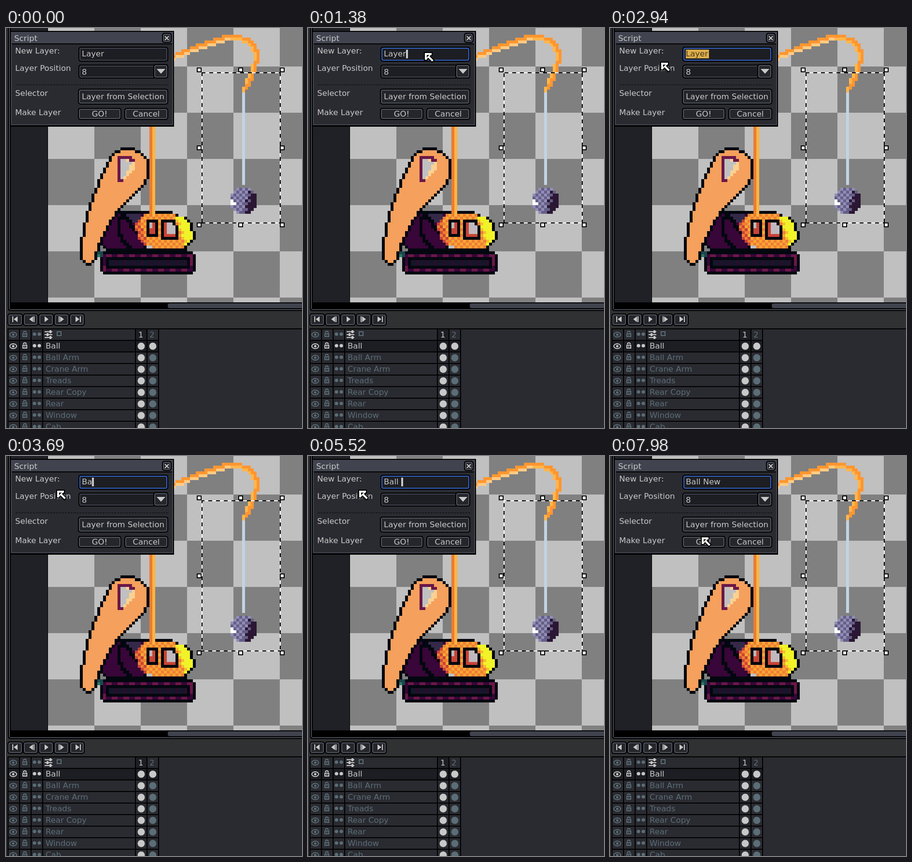
Animation of 613 by 831 pixels, one loop 8 s. Source, as an HTML page with a canvas:

```html
<!DOCTYPE html>
<html lang="en">
<head>
<meta charset="utf-8">
<title>Layer script dialog</title>
<style>
  html, body { margin: 0; width: 613px; height: 831px; overflow: hidden; background: #303132; }
  canvas { display: block; }
</style>
</head>
<body>
<canvas id="stage" width="613" height="831"></canvas>
<script>
const LOOP = 8000, CELL = 6, LEFT = 87, TOP = 2;
const INK = '#02070f', PANEL = '#2a2b31', DARK = '#1d1e23', LIGHT = '#c8c8c8', DIM = '#5b6d76';
const PLUM = '#380638', MAROON = '#6b1748', RED = '#c74435', RUST = '#ef7d35', AMBER = '#f8a634';
const stage = document.getElementById('stage').getContext('2d');
const back = document.createElement('canvas');
back.width = 613;
back.height = 831;
let g = back.getContext('2d');

// ---- drawing helpers ----
function rect(color, x, y, w, h) {
  g.fillStyle = color;
  g.fillRect(x, y, w, h);
}
function round(color, x, y, w, h, r = 4) {
  g.fillStyle = color;
  g.beginPath();
  g.roundRect(x, y, w, h, r);
  g.fill();
}
function box(x, y, w, h, line = '#50535f', fill = '#25262b') {
  round('#000', x, y, w, h, 5);
  round(line, x + 2, y + 2, w - 4, h - 4);
  round(fill, x + 4, y + 4, w - 8, h - 8, 2);
}
function useFont() {
  g.font = '16.5px "DejaVu Sans", sans-serif';
}
function text(str, x, y, color = LIGHT) {
  useFont();
  g.fillStyle = color;
  g.fillText(str, x, y);
}
function textWidth(str) {
  useFont();
  return g.measureText(str).width;
}
function polygon(color, ...points) {
  g.fillStyle = color;
  g.beginPath();
  points.forEach(p => g.lineTo(...p));
  g.closePath();
  g.fill();
}
function disc(color, x, y, r) {
  g.fillStyle = color;
  g.beginPath();
  g.arc(x, y, r, 0, 7);
  g.fill();
}

// ---- pixel art on the six-pixel sprite grid ----
const snap = (v, origin) => origin + Math.floor((v - origin) / CELL) * CELL;

function cells(color, inside) {
  for (let x = LEFT; x < 613; x += CELL)
    for (let y = TOP; y < 560; y += CELL)
      if (inside(x + 3, y + 3)) {
        const odd = ((x - LEFT + y - TOP) / CELL) & 1;
        rect(typeof color === 'function' ? color(x, y, odd) : color, x, y, CELL, CELL);
      }
}
function outlined(fill, inside) {
  cells(fill, inside);
  cells(INK, (x, y) => inside(x, y) &&
    !(inside(x - 6, y) && inside(x + 6, y) && inside(x, y - 6) && inside(x, y + 6)));
}
// Superellipse test; the lean shifts it sideways with height.
function oval(cx, cy, rx, ry, power = 2, lean = 0) {
  return (x, y) => Math.abs((x - cx - lean * (y - cy)) / rx) ** power + Math.abs((y - cy) / ry) ** power < 1;
}
function shape(...points) {
  const path = new Path2D();
  points.forEach(p => path.lineTo(...p));
  return (x, y) => g.isPointInPath(path, x, y);
}
function curve(color, [a, b, c, d], dx = 0, dy = 0) {
  for (let t = 0; t <= 1; t += 0.01) {
    const u = 1 - t;
    const at = i => u ** 3 * a[i] + 3 * u * u * t * b[i] + 3 * u * t * t * c[i] + t ** 3 * d[i];
    rect(color, snap(at(0) + dx, LEFT), snap(at(1) + dy, TOP), CELL, CELL);
  }
}

function drawTreads() {
  rect(INK, 225, 458, 150, 12);
  cells(INK, oval(294, 488, 101, 25, 6));
  cells((x, y) => (x - LEFT + (y > 488 ? 12 : 0)) % 24 < 12 ? MAROON : PLUM, oval(294, 488, 95, 19, 6));
  rect(INK, 207, 476, 174, 24);
  for (let x = 213; x < 375; x += 18) {
    rect('#151629', x, 482, 12, 12);
    rect('#290d2b', x + 12, 482, 6, 12);
  }
  rect('#1d474d', 189, 464, 12, 12);
  rect('#2c7760', 189, 470, 6, 6);
}

// A swept circle that shrinks and bends toward the tip.
function inArm(x, y) {
  for (let t = 0; t <= 1; t += 0.04) {
    const u = 1 - t;
    if (Math.hypot(x - 171 - 82 * u ** 1.7, y - 294 - 186 * t) < 19 + 27 * u ** 1.5) return true;
  }
  return false;
}

function drawArm() {
  outlined('#f5a05c', inArm);
  cells(MAROON, shape([231, 266], [256, 266], [267, 278], [243, 320], [231, 320]));
  cells('#fbd192', shape([243, 272], [268, 278], [264, 298], [243, 320]));
  cells('#c0c0c0', shape([237, 272], [262, 278], [243, 314], [237, 314]));
}

function drawCab() {
  const cab = oval(327, 422, 57, 37, 2.5, 0.2);
  cells(INK, (x, y) => x > 340 && cab(x - 6, y));
  cells((x, y, odd) => {
    const tone = x - 0.35 * (y - 386);
    if (tone < 270) return odd ? RED : RUST;
    if (tone > 346) return odd || tone > 352 ? '#f1f329' : '#f6bd2e';
    return odd ? RUST : AMBER;
  }, cab);
  rect(INK, 291, 398, 24, 36);
  rect(RED, 297, 404, 12, 24);
  rect('#c0b4b6', 297, 404, 6, 12);
  cells(INK, shape([321, 398], [345, 398], [357, 416], [357, 440], [321, 440]));
  rect(RED, 327, 404, 24, 30);
  cells(INK, shape([339, 398], [351, 398], [351, 416]));
  cells('#c0b9bd', shape([333, 404], [339, 404], [351, 416], [351, 428], [333, 428]));
}

function drawCrane() {
  outlined(PLUM, oval(246, 422, 58, 43, 3));
  curve(INK, [[244, 385], [225, 405], [232, 440], [258, 456]]);
  cells('#35294a', shape([249, 386], [276, 386], [276, 416]));
  curve(INK, [[243, 390], [256, 405], [270, 420], [288, 450]]);
  rect(INK, 243, 380, 102, 6);
  drawTreads();
  drawArm();
  drawCab();

  // mast, boom and rope
  rect('#e97d31', 297, 200, 6, 192);
  rect('#fdb440', 303, 200, 6, 192);
  const rise = [[342, 60], [400, 36], [440, 19], [474, 17]];
  const fall = [[474, 17], [532, 25], [532, 60], [495, 130]];
  curve('#ffcb83', rise, 0, 6);
  curve('#ffb64d', fall, -6, 3);
  curve('#ff9630', rise);
  curve('#ff9630', fall);
  rect('#c3d3e2', 489, 134, 6, 192);

  // ball
  cells((x, y, odd) => {
    if (x < 477 && y > 352 && y < 368 && x - 465 <= y - 356) return '#fff';
    const tone = x + (y - 358) * 0.3;
    if (tone > 503) return '#2b1734';
    if (tone > 494) return odd ? '#2b1734' : '#655f87';
    return odd ? '#655f87' : '#918db6';
  }, oval(492, 359, 28, 28));
}

function drawEditor() {
  rect('#303132', 0, 0, 613, 831);
  round('#000', 4, -10, 620, 598, 5);
  rect('#454852', 6, 0, 2, 584);
  rect('#454852', 8, 584, 605, 2);
  rect('#202126', 10, 0, 76, 570);
  for (let col = 0; col < 6; col++)
    for (let row = 0; row < 7; row++)
      rect((col + row) % 2 ? '#808080' : '#c0c0c0', LEFT + col * 96, row * 96 - 16, 96, 96);
  drawCrane();
  rect('#000', 8, 570, 605, 14);
  round('#40434e', 335, 572, 290, 10);
  rect('#454852', 8, 584, 605, 2);
  rect('#000', 8, 586, 605, 2);
  rect('#303132', 0, 588, 613, 243);
}

function button(label, x, y, w, h) {
  box(x, y, w, h);
  text(label, x + (w - textWidth(label)) / 2, y + h / 2 + 5);
}

function drawDialog() {
  rect('#000', 8, 6, 340, 199);
  rect('#41444f', 10, 8, 336, 194);
  rect('#000', 12, 32, 332, 2);
  rect(PANEL, 12, 34, 332, 166);
  text('Script', 17, 27);
  box(323, 10, 20, 21);
  g.strokeStyle = LIGHT;
  g.lineWidth = 2;
  g.beginPath();
  g.moveTo(329, 17); g.lineTo(337, 25);
  g.moveTo(337, 17); g.lineTo(329, 25);
  g.stroke();
  text('New Layer:', 19, 53);
  text('Layer Position', 19, 89);
  text('Selector', 19, 141);
  text('Make Layer', 19, 181);
  box(150, 76, 160, 29, '#41444f', DARK);
  text('8', 157, 97);
  box(305, 75, 31, 30);
  polygon(LIGHT, [312, 85], [330, 85], [321, 95]);
  for (let x = 20; x < 336; x += 6) rect('#17181c', x, 117, 4, 2);
  button('Layer from Selection', 149, 126, 187, 33);
  button('GO!', 149, 166, 90, 25);
  button('Cancel', 245, 166, 91, 25);
}

function drawPlayback() {
  for (let i = 0; i < 5; i++) {
    const x = 20 + i * 32, dir = Math.sign(i - 1.5);
    box(x - 17, 593, 32, 26);
    polygon(LIGHT, [x - 4 * dir, 599], [x + 4 * dir, 605], [x - 4 * dir, 611]);
    if (i !== 2) rect(LIGHT, x + (i % 4 ? -6 : 6) * dir - 1, 599, 2, 12);
  }
}

function rowIcons(cy, color) {
  g.strokeStyle = color;
  g.lineWidth = 2;
  g.beginPath();
  g.ellipse(15, cy + 1, 7, 5, 0, 0, 7);
  g.stroke();
  disc(color, 15, cy + 1, 2.5);
  g.strokeRect(35, cy - 1, 8, 6);
  rect(color, 38, cy + 1, 2, 2);
  g.beginPath();
  g.arc(39, cy - 3, 3, Math.PI, 0);
  g.stroke();
  disc(color, 59, cy, 3.6);
  disc(color, 69, cy, 3.6);
}

function drawTimeline() {
  rect('#000', 3, 624, 610, 207);
  rect(PANEL, 317, 626, 296, 205);
  const names = ['', 'Ball', 'Ball Arm', 'Crane Arm', 'Treads', 'Rear Copy', 'Rear', 'Window', 'Cab'];
  names.forEach((name, i) => {
    const cy = 636 + i * 24, active = i === 1, color = active ? LIGHT : DIM;
    for (const x of [5, 29, 53, 269, 293]) rect(active ? DARK : PANEL, x, cy - 10, 22, 22);
    rect(active ? DARK : PANEL, 77, cy - 10, 190, 22);
    rowIcons(cy, color);
    if (!name) return;
    text(name, 82, cy + 6, color);
    disc(LIGHT, 280, cy + 1, 7.5);
    disc(color, 304, cy + 1, 7.5);
  });
  for (let i = 0; i < 3; i++) {
    rect(LIGHT, 80, 630 + i * 6, 16, 2);
    rect(LIGHT, i % 2 ? 84 : 90, 628 + i * 6, 4, 6);
  }
  g.strokeStyle = DIM;
  g.strokeRect(106, 631, 8, 8);
  rect(DARK, 269, 626, 22, 22);
  text('1', 274, 643);
  text('2', 297, 643, DIM);
}

// ---- moving parts ----
const CLICK = 1280, DRAG = 1400;
const moves = [[60, 575, 200], [750, 248, 26], [1100, 240, 50], [DRAG, 240, 50],
  [1800, 76, 53], [2520, 104, 70], [7560, 104, 70], [7960, 188, 167]];
const typed = 'Ball New';
const keyTime = i => i < 5 ? 3100 + 310 * i : 6000 + 210 * (i - 5);

function cursorAt(t) {
  const i = moves.findIndex(m => m[0] > t);
  if (i < 0) return moves.at(-1).slice(1);
  const [t0, x0, y0] = moves[i - 1], [t1, x1, y1] = moves[i];
  const k = (t - t0) / (t1 - t0), e = k * k * (3 - 2 * k);
  return [Math.round(x0 + (x1 - x0) * e), Math.round(y0 + (y1 - y0) * e)];
}

function drawField(t, cursorX) {
  const focused = t >= CLICK;
  box(150, 39, 186, 31, focused ? '#3562c4' : '#41444f', DARK);
  const keys = [...typed].filter((_, i) => keyTime(i) <= t).length;
  const value = keys ? typed.slice(0, keys) : 'Layer';
  const edge = n => Math.round(157 + textWidth(value.slice(0, n)));
  const end = edge(value.length);
  text(value, 157, 59);
  if (!keys && t > DRAG) {
    const kept = t > 1800 ? 0 : [...value].filter((_, i) => edge(i) < cursorX).length;
    if (kept < value.length) {
      rect('#dcae4b', edge(kept), 45, end + 2 - edge(kept), 18);
      text(value.slice(kept), edge(kept), 59, '#4a391b');
      return;
    }
  }
  const since = t - (keys ? keyTime(keys - 1) : CLICK);
  if (focused && since % 1000 < 500) rect(LIGHT, end, 45, 4, 18);
}

function drawSelection(t) {
  g.lineWidth = 2;
  g.strokeStyle = '#fff';
  g.strokeRect(406, 93, 162, 312);
  g.strokeStyle = '#000';
  g.setLineDash([8, 8]);
  g.lineDashOffset = Math.floor(t / 90) * 2 % 16;
  g.beginPath();
  for (const y of [93, 405]) g.moveTo(405, y), g.lineTo(569, y);
  for (const x of [406, 568]) g.moveTo(x, 92), g.lineTo(x, 406);
  g.stroke();
  g.setLineDash([]);
  for (const x of [400, 486, 572])
    for (const y of [87, 249, 409])
      if (x !== 486 || y !== 249) {
        rect('#000', x - 5, y - 5, 10, 10);
        rect('#fff', x - 3, y - 3, 6, 6);
      }
}

// White arrow with a black rim and a black core.
function drawCursor(x, y) {
  g.save();
  g.translate(x, y);
  g.lineCap = 'square';
  for (const [color, width] of [['#000', 8], ['#fff', 4]]) {
    g.strokeStyle = color;
    g.lineWidth = width;
    g.beginPath();
    g.moveTo(14, 4); g.lineTo(4, 4); g.lineTo(4, 14);
    g.moveTo(7, 7); g.lineTo(17, 17);
    g.stroke();
  }
  g.lineWidth = 2;
  g.beginPath();
  g.moveTo(14, 5); g.lineTo(5, 14);
  g.stroke();
  polygon('#000', [6, 6], [11, 6], [6, 11]);
  g.restore();
}

drawEditor();
drawDialog();
drawPlayback();
drawTimeline();
g = stage;
const start = performance.now();

function frame() {
  const t = (performance.now() - start) % LOOP;
  const cursor = t >= 60 ? cursorAt(t) : null;
  g.drawImage(back, 0, 0);
  drawSelection(t);
  drawField(t, cursor ? cursor[0] : 613);
  if (cursor) drawCursor(...cursor);
  requestAnimationFrame(frame);
}
frame();
</script>
</body>
</html>
```
